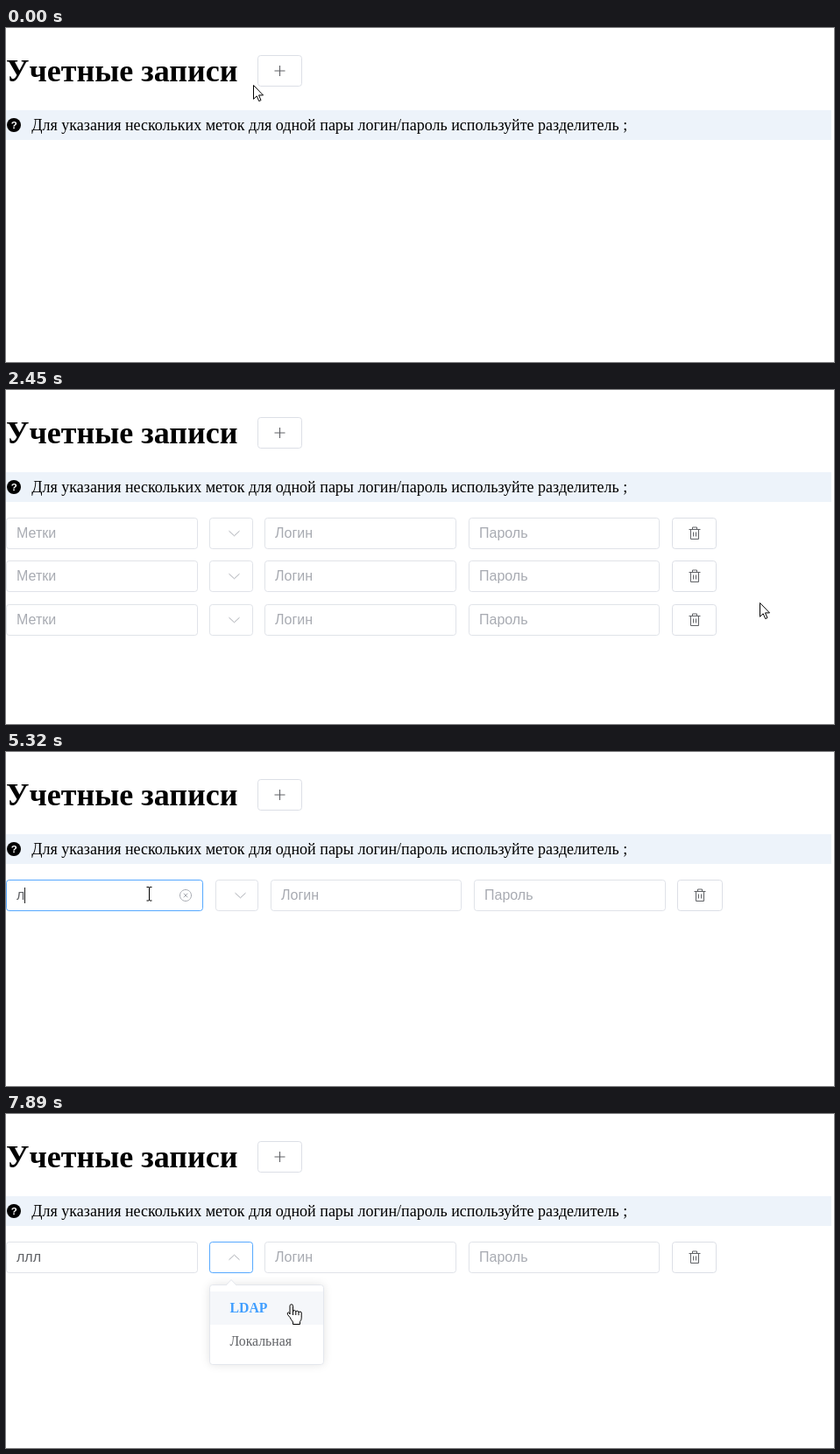
Recreate the animation shown at these times as an HTML page with a canvas. Size 945 by 382 pixels, loop 8 s.

```html
<!DOCTYPE html>
<html lang="ru">
<head>
<meta charset="utf-8">
<style>
html, body { margin: 0; width: 100%; height: 100%; overflow: hidden; background: #fff; }
canvas { display: block; }
</style>
</head>
<body>
<canvas id="stage" width="945" height="382"></canvas>
<script>
const c = document.getElementById('stage').getContext('2d');
const LOOP = 8000, BLUE = '#409eff', GREY = '#606266', LINE = '#dcdfe6', PALE = '#a8abb2';
const SERIF = '"Liberation Serif", "Times New Roman", serif';
const SANS = '"Liberation Sans", Arial, sans-serif';
const PLUS = [287, 31, 51, 36], MENU = [232, 195, 131, 92];
const FIELD = 218.6, KIND = 49.5, BUTTON = 51.4, GAP = 13.6, CLEAR = 6.5;

// Pointer moves: start time and destination
const START = { x: 282, y: 65 };
const MOVES = [
  { at: 70, x: 296, y: 44 },
  { at: 1980, x: 861, y: 243 },
  { at: 2480, x: 832, y: 256 },
  { at: 2800, x: 785, y: 256 },
  { at: 3240, x: 785, y: 215 },
  { at: 3800, x: 163, y: 162 },
  { at: 5850, x: 261, y: 172 },
  { at: 6700, x: 322, y: 253 },
  { at: 7410, x: 326, y: 218 },
];
const CLICKS = { add: [470, 960, 1380], remove: [3080, 3620], focus: [4370], open: [6249] };
const DELAY = 80, HOLD = 130, TYPED = [5320, 5580, 5720];

const HAND = new Path2D('M-2 11V1.5a1.75 1.75 0 0 1 3.5 0V8a1.65 1.6 0 0 1 3.3 .5a1.6 1.6 0 0 1 3.2 .7' +
  'a1.6 1.5 0 0 1 3.2 .8V15.5q0 2-1.7 4V22.5H1.5V20q-2-2.5-3.5-5.5L-4.5 11.5q-1-2.4 .8-2.7q1.2 0 1.7 2.2z');
const FINGERS = 'M1.5 8v4M4.8 8.5v3.5M8 9.2v3';
const ARROW = new Path2D('M.5 .5V16.3L4.2 12.8L6.7 18.6L9 17.6L6.5 11.9H11.5z');
const BEAM = 'M-3 -7.5h2.5l.5 .5l.5-.5h2.5M0 -7v14.5M-3 8h2.5l.5-.5l.5 .5h2.5';
const TRASH = 'M-6.5 -4.5H6.5M-2.5 -4.5V-7H2.5V-4.5M-4.5 -4.5V6.5H4.5V-4.5M-1.5 -1.5V3.5M1.5 -1.5V3.5';
const CROSS = 'M6.5 0A6.5 6.5 0 1 1 6.5 -.01M-2.3 -2.3L2.3 2.3M2.3 -2.3L-2.3 2.3';

const clamp = v => Math.max(0, Math.min(1, v));
const count = (times, t) => times.filter(at => t >= at).length;
const done = (name, t) => count(CLICKS[name], t - DELAY);
const inside = ([x, y, w, h], p) => p.x >= x && p.x < x + w && p.y >= y && p.y < y + h;

// Longer moves take longer; each eases in and out
function pointerAt(t) {
  let { x, y } = START;
  for (const to of MOVES) {
    const p = clamp((t - to.at) / (240 + .4 * Math.hypot(to.x - x, to.y - y)));
    const e = p * p * (3 - 2 * p);
    x += (to.x - x) * e;
    y += (to.y - y) * e;
  }
  return { x: Math.round(x), y: Math.round(y) };
}

function text(str, x, y, font, color) {
  c.font = font;
  c.fillStyle = color;
  c.fillText(str, x, y);
}

function box([x, y, w, h], stroke = LINE, fill = '#fff', width = 1) {
  c.beginPath();
  c.roundRect(x + width / 2, y + width / 2, w - width, h - width, 3.2);
  c.fillStyle = fill;
  c.fill();
  c.strokeStyle = stroke;
  c.lineWidth = width;
  c.stroke();
}

const input = (rect, active) => box(rect, active ? BLUE : LINE, '#fff', .9);

function button(rect, hover, pressed) {
  box(rect, pressed ? '#5cacf8' : hover ? '#b3d8ff' : LINE, hover ? '#ecf5ff' : '#fff');
}

function disc(x, y, r, fill) {
  c.beginPath();
  c.arc(x, y, r, 0, 7);
  c.fillStyle = fill;
  c.fill();
}

function lines(path, x, y, color, { angle = 0, width = 1, fill } = {}) {
  const shape = new Path2D(path);
  c.save();
  c.translate(x, y);
  c.rotate(angle);
  if (fill) {
    c.fillStyle = fill;
    c.fill(shape);
  }
  c.strokeStyle = color;
  c.lineWidth = width;
  c.stroke(shape);
  c.restore();
}

// Label, kind, login, password and delete controls laid out left to right
function rowRects(i, extra) {
  const y = Math.round(146 + 49.4 * i);
  let left = 0;
  return [FIELD + extra, KIND, FIELD, FIELD, BUTTON].map(w => {
    const x = Math.round(left), right = Math.round(left + w);
    left += w + GAP;
    return [x, y, right - x, 36];
  });
}

function drawRow(rects, s) {
  const [label, kind, login, password, remove] = rects, y = label[1];
  const write = (str, r, color = PALE) => text(str, r[0] + 12, y + 23, '16px ' + SANS, color);
  input(label, s.focused);
  if (s.typed) write('л'.repeat(s.typed), label, GREY);
  else write('Метки', label);
  if (s.caret) {
    c.fillStyle = '#222';
    c.fillRect(Math.round(12 + s.typed * 9.3), y + 9, 1, 18);
  }
  if (s.wide) lines(CROSS, label[2] - 20, y + 18, PALE);

  input(kind, s.open);
  const turn = 1 - (1 - s.open) ** 2;
  lines('M-6 -2.8L0 2.8L6 -2.8', kind[0] + 28.5, y + 18, PALE, { angle: Math.PI * turn });

  input(login);
  write('Логин', login);
  input(password);
  write('Пароль', password);
  button(remove, inside(remove, s.pointer));
  lines(TRASH, remove[0] + 26, y + 18, GREY);
}

function drawMenu(open, pointer) {
  const scale = 1 - (1 - open) ** 5, [x, y, w] = MENU;
  c.save();
  c.globalAlpha = scale;
  c.translate(0, y * (1 - scale));
  c.scale(1, scale);
  c.shadowColor = 'rgba(0,0,0,.12)';
  c.shadowBlur = 11;
  box(MENU, 'transparent');
  c.shadowColor = 'transparent';
  box(MENU, '#e4e7ed');
  lines('M-6 1L0 -5.5L6 1', x + 25, y, '#e4e7ed', { fill: '#fff' });
  c.fillStyle = '#f5f7fa';
  c.fillRect(x + 1, pointer.y >= 241 ? 241 : 203, w - 2, 38);
  text('LDAP', 255.5, 227, 'bold 15.75px ' + SERIF, BLUE);
  text('Локальная', 255.5, 265, '15.75px ' + SERIF, GREY);
  c.restore();
}

function drawPointer({ x, y }, kind) {
  if (kind === 'beam') return lines(BEAM, x + .5, y, '#000');
  lines(kind === 'hand' ? HAND : ARROW, x, y, '#000', { fill: '#fff' });
  if (kind === 'hand') lines(FINGERS, x, y, '#000');
}

function draw(t) {
  const pointer = pointerAt(t);
  const rows = done('add', t) - done('remove', t);
  const typed = count(TYPED, t);
  const focused = done('focus', t) && t < CLICKS.open[0];
  const wide = focused && typed > 0;
  const caret = focused && (t < 4850 || wide);
  const open = clamp((t - CLICKS.open[0] - DELAY) / 300);
  const pressed = Object.values(CLICKS).flat().some(at => t >= at && t < at + HOLD);
  const onPlus = inside(PLUS, pointer);
  let kind = onPlus ? 'hand' : 'arrow';

  c.fillStyle = '#fff';
  c.fillRect(0, 0, 945, 382);
  text('Учетные записи', 0, 61, 'bold 36px ' + SERIF, '#000');
  button(PLUS, onPlus, onPlus && pressed);
  lines('M-6 0H6M0 -6V6', 312.5, 49, onPlus ? BLUE : GREY, { width: 1.1 });

  c.fillStyle = '#edf3fa';
  c.fillRect(0, 94, 942, 34);
  disc(9, 111, 8, '#000');
  text('?', 5.8, 115.3, 'bold 11.5px ' + SANS, '#fff');
  text('Для указания нескольких меток для одной пары логин/пароль используйте разделитель ;',
    29.3, 117, '18px ' + SERIF, '#000');

  for (let i = 0; i < rows; i++) {
    const rects = rowRects(i, wide ? CLEAR : 0);
    drawRow(rects, i ? { pointer, typed: 0, open: 0 } : { pointer, typed, focused, wide, caret, open });
    const hit = rects.findIndex(r => inside(r, pointer));
    if (hit >= 0) kind = hit === 1 || hit === 4 ? 'hand' : 'beam';
  }
  if (open) {
    drawMenu(open, pointer);
    if (inside(MENU, pointer)) kind = 'hand';
  }
  if (pressed) disc(pointer.x, pointer.y, 15.6, 'rgba(250,250,0,.5)');
  drawPointer(pointer, kind);
}

function tick() {
  draw(performance.now() % LOOP);
  requestAnimationFrame(tick);
}
tick();
</script>
</body>
</html>
```
